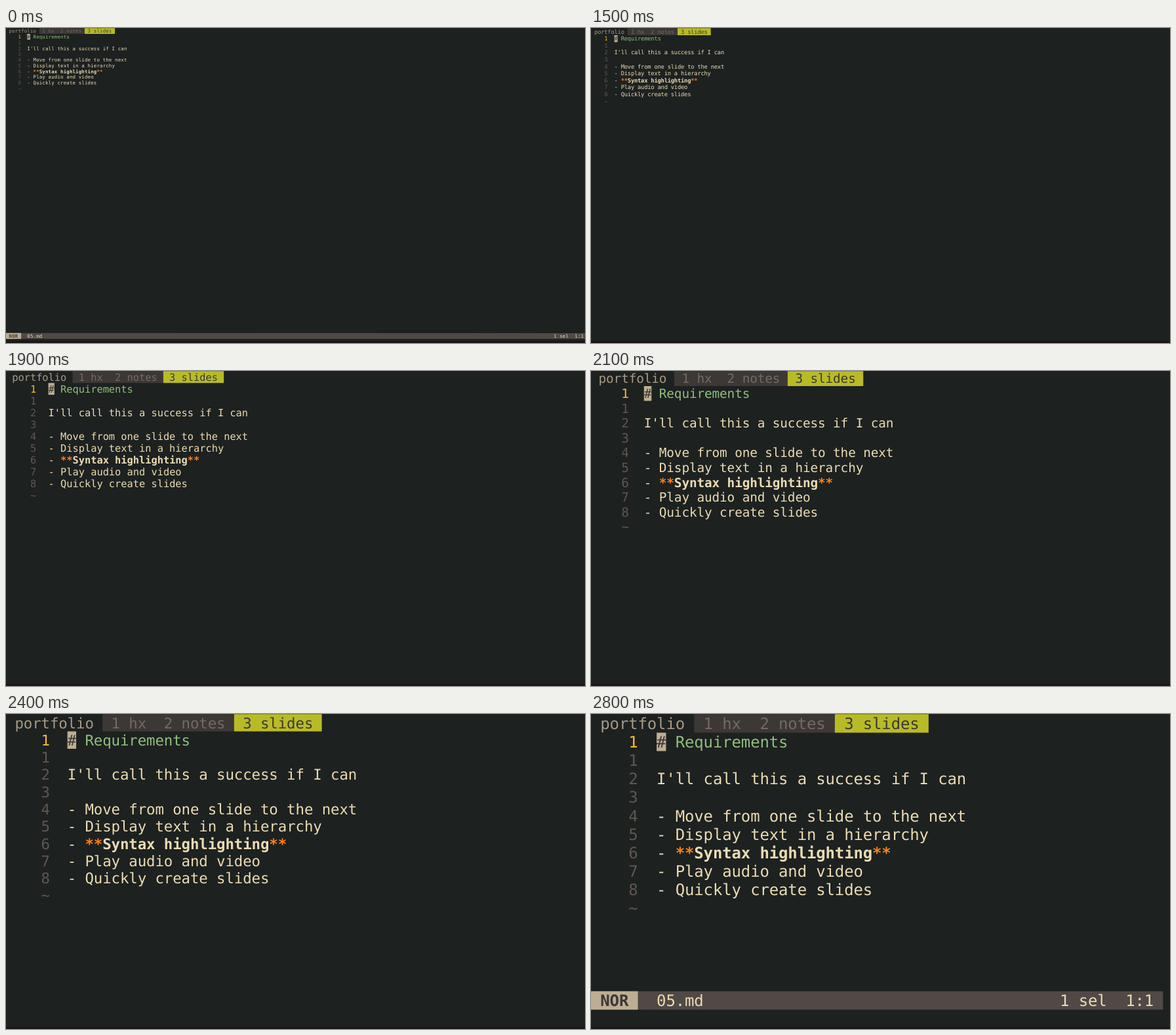
Recreate the animation shown at these times as an HTML page with a canvas. Size 883 px wide and 480 px high, loop 6.9 s.

```html
<!DOCTYPE html>
<html lang="en">
<head>
<meta charset="utf-8">
<title>Terminal zoom</title>
<style>
  html, body { margin: 0; width: 100%; height: 100%; overflow: hidden; background: #1d2120; }
  canvas { display: block; }
</style>
</head>
<body>
<canvas id="term" width="883" height="480"></canvas>
<script>
const LOOP = 6900;
const SCALE = 883 / 1914;              // terminal pixels to stage pixels
const SCREEN = { w: 1920, h: 1047 };
const TOP = 0.3;
const SKEW = 1e-5;                     // keeps baselines from snapping to whole pixels

// start ms, cell width, cell height, font size, status line drawn
const STEPS = [
  [0, 10, 19, 16, true],
  [1000, 10, 21, 17.33, true],
  [1500, 11, 23, 19, false],
  [1600, 14, 27, 22.67, false],
  [1700, 16, 31, 26, false],
  [1800, 18, 35, 29.67, false],
  [1900, 20, 39, 33.33, false],
  [2000, 22, 44, 37.33, false],
  [2100, 25, 49, 42, false],
  [2200, 25, 49, 42, true],
  [2300, 27, 53, 45.33, false],
  [2400, 29, 57, 48.67, false],
  [2500, 31, 61, 52, false],
  [2700, 31, 61, 52, true]
];

const STYLES = {
  session: { ink: '#a89984' },
  tab: { ink: '#756a60', fill: '#3c3836' },
  active: { ink: '#3c3836', fill: '#b8bb26' },
  num: { ink: '#5f5750' },
  current: { ink: '#fabd2f' },
  text: { ink: '#ebdbb2' },
  head: { ink: '#8ec07c' },
  cursor: { ink: '#3c3836', fill: '#bdae93' },
  mark: { ink: '#fe8019', bold: true },
  strong: { ink: '#ebdbb2', bold: true },
  bar: { ink: '#ebdbb2', fill: '#504945' },
  mode: { ink: '#3c3836', fill: '#bdae93', bold: true }
};

const LINES = [
  '',
  "I'll call this a success if I can",
  '',
  '- Move from one slide to the next',
  '- Display text in a hierarchy',
  '- ',
  '- Play audio and video',
  '- Quickly create slides'
];

const ctx = document.getElementById('term').getContext('2d');

function show([, w, h, size, drawn]) {
  const ascent = Math.ceil(size * 0.928);

  // writes text into the character grid
  function run(row, col, text, style) {
    const { ink, fill, bold } = STYLES[style];
    if (fill) {
      ctx.fillStyle = fill;
      ctx.fillRect(col * w, row * h, text.length * w, h);
    }
    ctx.fillStyle = ink;
    ctx.font = `${bold ? 'bold ' : ''}${size}px "DejaVu Sans Mono", monospace`;
    [...text].forEach((ch, i) => {
      if (ch !== ' ') ctx.fillText(ch, (col + i) * w, row * h + ascent);
    });
  }

  ctx.setTransform(1, 0, 0, 1, 0, 0);
  ctx.fillStyle = '#1d2120';
  ctx.fillRect(0, 0, 883, 480);
  ctx.fillStyle = '#1c1418';
  ctx.fillRect(0, 477, 883, 3);
  ctx.setTransform(SCALE, SKEW, SKEW, SCALE, 0, TOP);
  ctx.textRendering = 'geometricPrecision';

  run(0, 0, ' portfolio ', 'session');
  run(0, 11, ' 1 hx  2 notes ', 'tab');
  run(0, 26, ' 3 slides ', 'active');

  run(1, 4, '1', 'current');
  run(1, 7, '#', 'cursor');
  run(1, 9, 'Requirements', 'head');
  LINES.forEach((line, i) => {
    run(i + 2, 4, String(i + 1), 'num');
    run(i + 2, 7, line, 'text');
  });
  run(7, 9, '**', 'mark');
  run(7, 11, 'Syntax highlighting', 'strong');
  run(7, 30, '**', 'mark');
  run(10, 4, '~', 'num');

  if (drawn) {
    const row = Math.floor(SCREEN.h / h) - 2;
    const cols = Math.floor(SCREEN.w / w);
    run(row, 0, '       05.md'.padEnd(cols - 11) + '1 sel  1:1 ', 'bar');
    run(row, 0, ' NOR ', 'mode');
  }
}

let shown = null;
function tick() {
  const t = performance.now() % LOOP;
  const step = STEPS.findLast(s => s[0] <= t);
  if (step !== shown) show(shown = step);
  requestAnimationFrame(tick);
}
tick();
</script>
</body>
</html>
```
